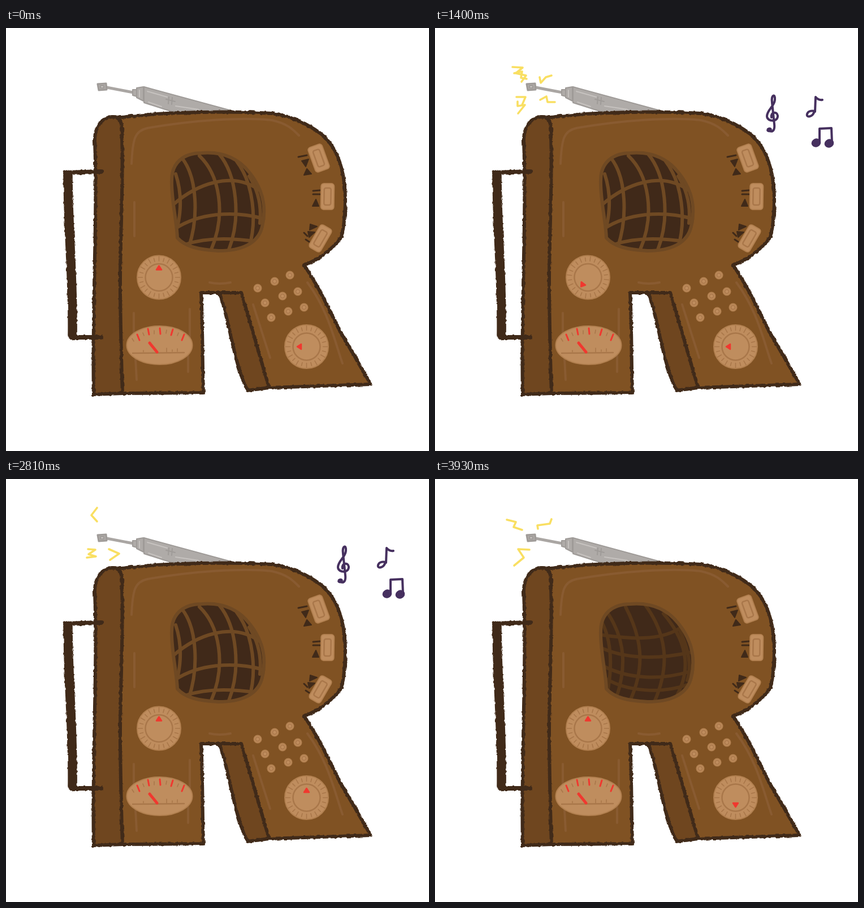
An HTML page that plays this animation: 748x748 px, repeating every 3960 ms.

```html
<!DOCTYPE html>
<html lang="en">
<head>
<meta charset="utf-8">
<title>R is for radio</title>
<style>
  html, body { margin: 0; width: 100%; height: 100%; overflow: hidden; background: #fff; }
  svg { display: block; width: 100vw; height: 100vh; }
  path, line, ellipse, circle, rect { stroke-linecap: round; stroke-linejoin: round; }
  .ink { fill: none; stroke: #402a19; stroke-width: 6; }
  .solid { fill: #402a19; stroke: #402a19; stroke-width: 2; }
  .shine { fill: none; stroke: #895b31; stroke-width: 4; }
  .tan { fill: #bf8d5e; stroke: #b28050; stroke-width: 2; }
  .groove { fill: none; stroke: #a9774a; stroke-width: 2.5; }
  .tick { fill: none; stroke: #a9774a; stroke-width: 1.6; }
  .red { fill: none; stroke: #f0382f; stroke-width: 3; }
  .metal { fill: #afaba8; stroke: #9f9b98; stroke-width: 2; }
  .grid { fill: none; stroke-width: 6; }
  #sparks { fill: none; stroke: #f9df62; stroke-width: 3.6; }
  #notes { fill: none; stroke: #46305f; stroke-width: 4; }
  #notes .head { fill: #46305f; stroke: none; }
</style>
</head>
<body>
<svg viewBox="0 0 748 748" xmlns="http://www.w3.org/2000/svg">
  <defs>
    <filter id="rough" filterUnits="userSpaceOnUse" x="0" y="0" width="748" height="748" color-interpolation-filters="sRGB">
      <feTurbulence type="fractalNoise" baseFrequency=".16" numOctaves="2" seed="4"/>
      <feColorMatrix values="1 0 0 0 0  0 1 0 0 0  0 0 1 0 0  0 0 0 0 1" result="grain"/>
      <feDisplacementMap in="SourceGraphic" in2="grain" scale="4" xChannelSelector="R" yChannelSelector="G"/>
    </filter>
    <path id="mesh" d="M293 269C293 239 313 221 346 221C385 218 411 231 430 255C455 286 461 318 453 351C446 382 415 394 376 394C341 392 317 387 303 371C302 341 292 303 293 269Z"/>
    <clipPath id="meshClip"><use href="#mesh"/></clipPath>
  </defs>

  <g class="metal">
    <path d="M178 105L225 114" stroke-width="5" fill="none" stroke="#aaa6a3"/>
    <path d="M162 99L177 98L178 109L164 110Z" stroke-width="3"/>
    <path d="M167 102L173 102L173 106L167 106Z" fill="#c8c4c1"/>
    <path d="M224 109L231 109L231 121L224 119Z"/>
    <path d="M231 106L243 104L243 129L231 123Z"/>
    <path d="M244 104L402 147L294 148L244 132Z"/>
    <path d="M283 126L299 130M288 122L287 134M294 123L293 135" fill="none"/>
    <path d="M236 110V122M250 112L285 122M252 131L275 139M300 138L340 144" fill="none" stroke="#c6c2bf"/>
  </g>

  <path fill="#805223" d="M188 157L205 158C270 149 390 146 470 151C506 156 532 169 557 187C585 210 599 250 600 301C600 330 597 354 593 370C576 392 552 411 527 419C556 462 572 500 590 535L644 630L465 635L416 468L345 468L349 645L206 645Z"/>
  <path fill="#6f461f" d="M155 647C152 500 161 330 157 200C156 180 168 157 188 157C201 157 207 166 205 192C208 280 201 380 202 470C203 540 204 600 206 645Z"/>
  <path fill="#6f461f" d="M378 470C396 520 402 590 427 640L465 635C450 585 432 520 416 468Z"/>

  <g class="shine">
    <path d="M222 240C224 195 228 182 250 177C330 163 420 157 470 163C498 169 508 180 518 190"/>
    <path d="M227 308V368M226 504V545M229 585L231 622M325 497V548M322 580V608M360 450Q378 454 397 450"/>
    <path d="M437 489L467 583M533 450C570 500 580 550 595 593"/>
  </g>

  <g class="ink" filter="url(#rough)">
    <path d="M155 648C152 500 162 330 157 200C156 176 170 157 188 157L205 158C270 149 390 146 470 151C506 156 532 169 557 187C585 210 599 250 600 301C600 330 597 354 593 370C576 392 552 411 527 419C556 462 572 500 590 535L645 630L465 636L427 641C402 590 396 520 378 470"/>
    <path d="M188 157C201 157 207 166 205 192C208 280 201 380 202 470C203 540 204 600 206 644"/>
    <path d="M465 635C450 585 432 520 416 468L345 468C348 520 347 590 349 645L206 646L155 648"/>
    <path d="M105 256L168 254M116 547L168 547" stroke-width="8"/>
    <path d="M109.500 260C110 360 119 450 117.500 543" stroke-width="16.500"/>
  </g>

  <g class="solid">
    <path d="M517 228L532 225M543 288L555 287M543 294L555 294M530 374L536 378M527 362L533 368" fill="none" stroke-width="3"/>
    <path d="M523 235L535 232L530 245ZM532 249L540 258L527 260ZM548 303L553 315L542 315ZM538 347L550 351L537 357ZM534 360L546 361L536 370Z"/>
  </g>
  <g id="sliders"></g>
  <g id="dots"></g>

  <ellipse class="tan" cx="271.500" cy="561" rx="58" ry="34"/>
  <path class="groove" d="M224 575L315 574"/>
  <path class="tick" d="M243 570V573M284 566V573M294 569V572M303 567V572M223 549L226 554M242 539L244 544M262 535V541M284 534L283 540M305 539L303 544"/>
  <path class="red" d="M232 542L236 552M251 532L253 542M272 531L273 541M295 533L292 543M315 542L311 552"/>
  <path class="red" style="stroke-width:5" d="M254 557L267 573"/>

  <use href="#mesh" fill="#402919"/>
  <g clip-path="url(#meshClip)">
    <path id="gridA" class="grid" stroke="#6f4923" d="M300 258Q314 300 304 348M312 231C338 265 341 335 323 388M342 226C378 260 390 330 362 394M377 223C408 260 416 335 394 392M408 236C438 275 444 340 430 388M430 262Q454 300 449 345M296 312C335 278 400 250 450 288M299 355C340 328 400 322 455 337M316 383C355 370 400 371 444 378"/>
    <path id="gridB" class="grid" stroke="#553619" d="M296 255Q318 300 306 372M306 238C340 290 336 340 321 386M337 226C365 280 373 330 345 392M372 223C410 275 416 330 388 394M404 238C440 280 458 330 426 386M432 266Q458 320 446 356M297 276C335 281 400 290 438 260M297 300C345 320 400 318 454 306M300 332C345 354 400 356 452 340M302 353C340 376 400 380 446 364"/>
  </g>
  <use href="#mesh" fill="none" stroke="#6f4923" stroke-width="6"/>

  <g id="knobs"></g>
  <g id="sparks"></g>
  <g id="notes"></g>
</svg>

<script>
const $ = id => document.getElementById(id);
const line = d => `<path d="${d}"/>`;

$('sliders').innerHTML = [[553, 230, -20, 26], [568.5, 298, 1, 23], [556, 372, 30, 23]].map(([x, y, a, w]) =>
  `<g transform="translate(${x} ${y}) rotate(${a})">
    <rect class="tan" x="${-w / 2}" y="-23" width="${w}" height="46" rx="5"/>
    <rect class="groove" x="-6" y="-15" width="12" height="30" rx="3"/></g>`).join('');

$('dots').innerHTML = [[445, 460], [475, 448], [502, 437], [458, 486], [489, 474], [516, 466], [469, 512], [499, 501], [527, 494]]
  .map(([x, y]) => `<circle class="tan" cx="${x}" cy="${y}" r="6.5"/><circle class="tick" cx="${x}" cy="${y}" r="3.5"/>`).join('');

// reach: distance from the centre to the pointer's base
function knob(id, x, y, reach) {
  let ticks = '';
  for (let i = 0; i < 24; i++) ticks += `<path class="tick" d="M0 -29V-${i % 2 ? 35 : 37}" transform="rotate(${i * 15})"/>`;
  return `<g transform="translate(${x} ${y})"><circle class="tan" r="38.5"/><g id="${id}">
    <circle class="groove" r="24"/>${ticks}
    <path d="M-4.500 -${reach}H4.500L0 -${reach + 7}Z" fill="#f0382f" stroke="#f0382f" stroke-width="2.5"/></g></g>`;
}
$('knobs').innerHTML = knob('knobL', 270.5, 441, 13.5) + knob('knobR', 531.5, 563.5, 9.5);

// Sparks around the antenna tip
const bolts = {
  a: ['M155 69L140 74L147 83L145 95', 'M160 122L149 123L150 130L160 131L146 138', 'M177 122L190 121L183 133L199 135'],
  b: ['M134 74L156 81L147 84L157 94L145 95', 'M181 94L197 81L199 92L210 89'],
  c: ['M137 69L155 70L143 80L161 84L153 95', 'M144 122L160 122L154 136', 'M186 127L197 121L199 131L212 131'],
  d: ['M140 80L154 77L152 88L162 90', 'M185 87L187 97L196 87L206 84', 'M146 130L146 138L159 136L147 151'],
  e: ['M160 67L176 79L163 89L175 90', 'M160 121L149 117L151 135L135 133', 'M185 121L182 128L190 134L184 147'],
  f: ['M161 51L151 64L161 75', 'M145 124L158 125L146 133L159 137L143 139', 'M182 124L200 132L184 143'],
  g: ['M142 62L154 67L151 78L161 81L155 94', 'M177 82L186 83L182 92L195 91L212 76', 'M158 122L147 120L148 132L136 134', 'M181 132L193 124L189 136L204 140'],
  h: ['M157 60L147 75L152 93', 'M178 93L196 82L193 90L209 84', 'M163 125L157 137L136 143', 'M187 125L200 134L182 135L204 146'],
  i: ['M127 72L143 76L139 85L154 90', 'M182 88L181 82L203 79L206 71', 'M167 125L147 124L157 139L140 153']
};
const sparkOrder = ' ceabcdhebhcfghai';
const sparks = k => (bolts[sparkOrder[k]] || []).map(line).join('');

// Musical notes
const head = (x, y, rx = 8.5, ry = 7.5) => `<ellipse class="head" cx="${x}" cy="${y}" rx="${rx}" ry="${ry}" transform="rotate(-25 ${x} ${y})"/>`;
const pair = (x, y, extra = '') => `<g transform="translate(${x} ${y})">${head(-11, 9)}${head(12, 10)}
  ${line('M-5 9L-5 -16L16 -17L17 9' + extra)}</g>`;
const eighth = (x, y, stem) => head(x, y) + line(`M${x + 5} ${y}${stem}`);
const treble = (x, y, a) => `<g transform="translate(${x} ${y}) rotate(${a})">${head(-6, 28, 5, 4)}
  ${line('M-6 30C2 33 4 26 3 18L-1 -20C-3 -34 5 -37 4 -25C3 -13 -10 -7 -10 4C-10 14 10 15 9 3C8 -5 -4 -4 -2 6')}</g>`;
const bass = (x, y) => `<g transform="translate(${x} ${y})">${head(-9, -6, 6, 6)}
  <path d="M-12 -8C-10 -20 7 -19 8 -6C9 6 -2 14 -12 18" stroke-width="6"/>${head(16, -5, 3, 3)}${head(17, 8, 3, 3)}</g>`;

const trio = eighth(610, 147, 'L616 117Q618 128 628 131') + eighth(688, 136, 'L694 110Q702 113 712 112') + bass(662, 172);
const tunes = {
  C: trio,
  X: trio + pair(675, 67, 'M-5 -5L16 -6'),
  D: treble(597, 152, 0) + line('M672 148L673 122Q678 128 685 127M671 147C668 158 656 159 658 152C660 146 667 146 671 147') + pair(685, 194),
  E: pair(603, 127) + treble(680, 148, 10) + eighth(640, 213, 'L645 189Q648 195 656 194'),
  F: pair(685, 92) + eighth(602, 160, 'L608 132Q612 142 620 144') + bass(655, 198)
};
const tuneOrder = '  EDXEDCEDCEDCEDF';

const LOOP = 3960;
const starts = [0, 270, 470];
for (let t = 710; t <= 3700; t += 230) starts.push(t);
const turnL = [0, 30, 60, 90, 120, 168, 217, 266, 315];
let shown = '';

function draw(now) {
  const t = now % LOOP;
  let k = starts.length - 1;
  while (starts[k] > t) k--;
  // Old sparks linger briefly under the new ones
  const overlap = k > 1 && t < starts[k] + (k === 2 ? 70 : 30);
  const ended = t >= 3930;
  const key = [k, overlap, ended].join();
  if (key !== shown) {
    shown = key;
    const dim = k % 2 === 1 || k === 16;
    $('gridA').style.display = dim ? 'none' : '';
    $('gridB').style.display = dim ? '' : 'none';
    $('knobL').setAttribute('transform', `rotate(${turnL[k] || 0})`);
    $('knobR').setAttribute('transform', `rotate(${270 + 45 * Math.max(0, k - 10)})`);
    $('sparks').innerHTML = sparks(k) + (overlap ? sparks(k - 1) : '');
    $('notes').innerHTML = ended ? '' : tunes[tuneOrder[k]] || '';
  }
}

const begin = performance.now();
function tick() {
  draw(performance.now() - begin);
  requestAnimationFrame(tick);
}
tick();
</script>
</body>
</html>
```
